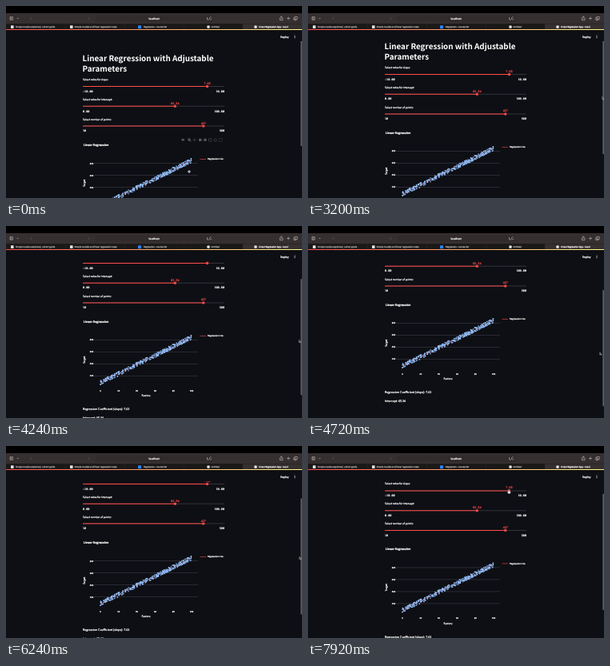
Recreate the animation shown at these times as an HTML page. Size 370x240 px, loop 8 s.

```html
<!DOCTYPE html>
<html lang="en">
<head>
<meta charset="utf-8">
<title>Linear Regression</title>
<style>
  html, body { margin: 0; width: 100%; height: 100%; overflow: hidden; background: #0e0f14; }
  svg { display: block; width: 370px; height: 240px; }
  text {
    font-family: "Noto Sans CJK JP", "Noto Sans CJK SC", "Noto Sans CJK", "Open Sans", sans-serif;
    font-size: 3.15px; fill: #fff; stroke: #fff; stroke-width: .2px;
    text-rendering: geometricPrecision; white-space: pre;
  }
  .mono { font-family: "Noto Sans Mono", "DejaVu Sans Mono", monospace; font-size: 3.5px; }
  .bold { font-weight: 700; }
  .heading { font-size: 9.85px; stroke: none; }
</style>
</head>
<body>
<svg id="stage" viewBox="0 0 370 240" xmlns="http://www.w3.org/2000/svg">
  <defs>
    <clipPath id="view"><rect y="44" width="370" height="196"/></clipPath>
    <linearGradient id="accent"><stop stop-color="#ff4b4b"/><stop offset="1" stop-color="#fffd80"/></linearGradient>
  </defs>
  <rect width="370" height="240" fill="#0e0f14"/>
  <g clip-path="url(#view)">
    <g id="page"></g>
    <rect id="thumb" x="368.3" width="1.7" height="145" fill="#5c5c60"/>
  </g>
  <g id="chrome"></g>
  <g id="cursor">
    <path id="cross" d="M-2 0H2M0 -2V2" stroke="#fff" stroke-width=".8"/>
    <path id="arrow" d="M-.7 -1.6V1.6L.1 .9L.7 2L1.2 1.8L.7 .7H1.6Z" fill="#111" stroke="#fff" stroke-width=".4"/>
    <path id="hand" d="M-.7 -2.2Q0 -2.8 .5 -2V-.4L2 0Q2.6 .5 2 2.4H-.8L-2.1 .5Q-1.8 -.2 -.7 .5Z" fill="#fff" stroke="#222" stroke-width=".3"/>
  </g>
</svg>
<script>
const $ = id => document.getElementById(id);
const page = $('page'), chrome = $('chrome');
const RED = '#ff4b4b', LEFT = 96, RIGHT = 273;

function add(parent, tag, attrs, content = '') {
  const node = document.createElementNS('http://www.w3.org/2000/svg', tag);
  for (const key in attrs) node.setAttribute(key, attrs[key]);
  node.textContent = content;
  return parent.appendChild(node);
}
const rect = (parent, x, y, width, height, fill, rx = 0) =>
  add(parent, 'rect', { x, y, width, height, fill, rx });
const label = (parent, x, y, content, attrs = {}) => add(parent, 'text', { x, y, ...attrs }, content);
const stroke = (parent, d, color, width = 0.5) =>
  add(parent, 'path', { d, fill: 'none', stroke: color, 'stroke-width': width });
const size = px => `font-size:${px}px`;
const tint = color => `fill:${color};stroke:${color}`;
const END = { 'text-anchor': 'end' }, MIDDLE = { 'text-anchor': 'middle' };

function slider(y, name, value, min, max, x) {
  label(page, LEFT, y - 7.4, name);
  rect(page, LEFT, y - 0.5, RIGHT - LEFT, 1, '#31333b', 0.5);
  rect(page, LEFT, y - 0.5, x - LEFT, 1, RED, 0.5);
  add(page, 'circle', { cx: x, cy: y, r: 1.7, fill: RED });
  label(page, x, y - 2.6, value, { class: 'mono', style: tint(RED), ...MIDDLE });
  label(page, LEFT, y + 7.2, min, { class: 'mono' });
  label(page, RIGHT, y + 7.2, max, { class: 'mono', ...END });
}

function buildPage() {
  const heading = { class: 'bold heading' };
  label(page, LEFT - 0.5, 68.6, 'Linear Regression with Adjustable', heading);
  label(page, LEFT - 0.5, 81.6, 'Parameters', heading);
  slider(100.5, 'Select value for slope:', '7.63', '-10.00', '10.00', 251.5);
  slider(125.3, 'Select value for intercept:', '65.34', '0.00', '100.00', 211.3);
  slider(150.1, 'Select number of points:', '427', '10', '500', 246.8);
  buildChart();
  label(page, LEFT, 284.3, 'Regression Coefficient (slope): 7.63', { style: size(3.6) });
  label(page, LEFT, 295, 'Intercept: 65.34', { style: size(3.6) });
}

function buildChart() {
  const tick = size(2.7);
  label(page, LEFT + 0.7, 174.9, 'Linear Regression', { class: 'bold', style: size(3.64) });
  for (let i = 0; i < 4; i++) {
    const y = 196.5 + i * 15;
    stroke(page, `M110 ${y}H240`, '#32333b', 0.8);
    label(page, 109.3, y + 1, 800 - i * 200, { style: tick, ...END });
  }
  for (let i = 0; i < 6; i++) label(page, 118 + i * 22.8, 261, i * 20, { style: tick, ...MIDDLE });
  label(page, 175, 267.2, 'Feature', MIDDLE);
  label(page, 0, 0, 'Target', { transform: 'translate(99.2 221.5) rotate(-90)', ...MIDDLE });

  stroke(page, 'M118 250L232 193', RED);
  let seed = 7;
  const random = () => (seed = seed * 16807 % 2147483647) / 2147483647;
  for (let i = 0; i < 427; i++) {
    const u = random();
    add(page, 'circle', { cx: 118 + 114 * u, cy: 250 - 57 * u + (random() - 0.5) * 5.4, r: 0.74, fill: '#94c2ff' });
  }
  stroke(page, 'M242.5 191.5H250', RED, 0.6);
  label(page, 252, 192.4, 'Regression Line', { style: tick });
}

function buildModebar() {
  const bar = add(page, 'g', {});
  const color = '#55565c';
  rect(bar, 219.5, 166, 3.4, 2.6, color, 0.5);
  stroke(bar, 'M230 168.2L231.3 169.4', '#a4a6aa', 0.7);
  add(bar, 'circle', { cx: 228.9, cy: 167, r: 1.3, fill: 'none', stroke: '#a4a6aa', 'stroke-width': 0.6 });
  stroke(bar, 'M233.5 167.4H237.5M235.5 165.4V169.4', color);
  for (const x of [241, 247.2]) rect(bar, x, 165.8, 3.4, 3.2, color, 0.4);
  stroke(bar, 'M253.5 165.7H257V169.2H253.5ZM260 168.9V167L261.6 165.6L263.2 167V168.9Z', color);
  stroke(bar, 'M266.3 167V165.7H267.6M268.7 165.7H270V167M270 168V169.3H268.7M267.6 169.3H266.3V168', color);
  return bar;
}

function buildChrome() {
  const bar = '#362f2f';
  rect(chrome, 0, 0, 370, 9, '#000');
  rect(chrome, 0, 9, 370, 13.5, bar);
  rect(chrome, 0, 22.5, 370, 6.5, '#1b1818');
  rect(chrome, 296, 22.5, 74, 6.5, bar);
  for (let i = 1; i < 4; i++) rect(chrome, i * 74, 22.5, 0.4, 6.5, bar);

  const icon = '#dcdadb';
  stroke(chrome, 'M5 13.7H8.5V17.2H5ZM6.4 13.7V17.2M13.8 15L14.7 16L15.6 15', icon);
  stroke(chrome, 'M32 14L30.6 15.5L32 17M103 14L104.4 15.5L103 17', '#6a6465');
  rect(chrome, 112, 11.8, 147, 7.4, '#312b2b', 1.5);
  label(chrome, 185, 16.7, 'localhost', { style: size(3.1), ...MIDDLE });
  stroke(chrome, 'M251.5 14V17H254.2M256.8 14.2A1.5 1.5 0 1 0 257.3 15.8', icon);
  stroke(chrome, 'M343 14.8H342.4V17.7H346V14.8H345.4M344.2 16.2V12.9M343.2 13.8L344.2 12.8L345.2 13.8' +
    'M351.2 15.5H354.8M353 13.7V17.3M361 13.5H364.2V16.4H361ZM362.8 16.4V17.6H359.8V14.7H361', icon);

  const tabText = (x, content, color = '#b4b2b3') =>
    label(chrome, x, 27.1, content, { style: size(2.7) + ';' + tint(color) });
  rect(chrome, 6, 24.3, 3.6, 3.6, '#e2e2e4', 0.5);
  tabText(12, 'Simple models explained, a short guide');
  rect(chrome, 80, 24.3, 3.6, 3.6, '#e2e2e4', 0.5);
  tabText(85.5, 'Simple models and linear regression notes');
  rect(chrome, 165, 24.2, 4, 4, '#2f80f0', 0.5);
  tabText(172, 'Regression - Course list');
  add(chrome, 'circle', { cx: 253, cy: 26.1, r: 1.9, fill: '#e2e2e4' });
  tabText(256.4, 'Untitled');
  add(chrome, 'circle', { cx: 312, cy: 26.1, r: 1.9, fill: '#e2e2e4' });
  tabText(316, 'Linear Regression App - Local', '#fff');

  rect(chrome, 0, 29, 370, 1, 'url(#accent)');
  label(chrome, 342.8, 39.5, 'Deploy', { style: size(3.3) });
  for (const cy of [37.1, 38.4, 39.7]) add(chrome, 'circle', { cx: 361, cy, r: 0.5, fill: '#fff' });
}

// Linear interpolation through [time, value] stops.
function follow(stops, t) {
  const next = stops.findIndex(stop => stop[0] > t);
  if (next < 0) return stops[stops.length - 1][1];
  const [t0, a] = stops[next - 1], [t1, b] = stops[next];
  return a + (b - a) * (t - t0) / (t1 - t0);
}

const scrollStops = [[0, 0], [2720, 0], [3200, 15], [4240, 54], [5200, 96], [5650, 96], [6240, 53], [6720, 44.6]];
const cursorX = [[0, 229], [400, 229], [900, 264], [1760, 345], [2000, 365], [2640, 368], [3200, 368.5],
  [4240, 367], [5200, 364], [5600, 364], [5750, 367.5], [6960, 367.5], [7700, 251]];
const cursorY = [[0, 207], [400, 207], [900, 186], [1760, 120], [2000, 102], [2640, 104], [3200, 115],
  [4240, 144], [5200, 175], [5650, 175], [6240, 140], [6720, 134], [6960, 134], [7700, 57]];

buildPage();
buildChrome();
const modebar = buildModebar();
const show = (node, visible) => node.setAttribute('visibility', visible ? 'visible' : 'hidden');

function draw(now) {
  const t = now % 8000;
  const scroll = follow(scrollStops, t), x = follow(cursorX, t), y = follow(cursorY, t);
  page.setAttribute('transform', `translate(0 ${-scroll})`);
  $('thumb').setAttribute('y', 30 + scroll * 0.67);
  $('cursor').setAttribute('transform', `translate(${x} ${y})`);
  const overPlot = t < 2000 && x < 240, overSlider = t > 7600;
  show($('cross'), overPlot);
  show($('hand'), overSlider);
  show($('arrow'), !overPlot && !overSlider);
  show(modebar, t < 2000 && x < RIGHT);
  requestAnimationFrame(draw);
}
draw(performance.now());
</script>
</body>
</html>
```
